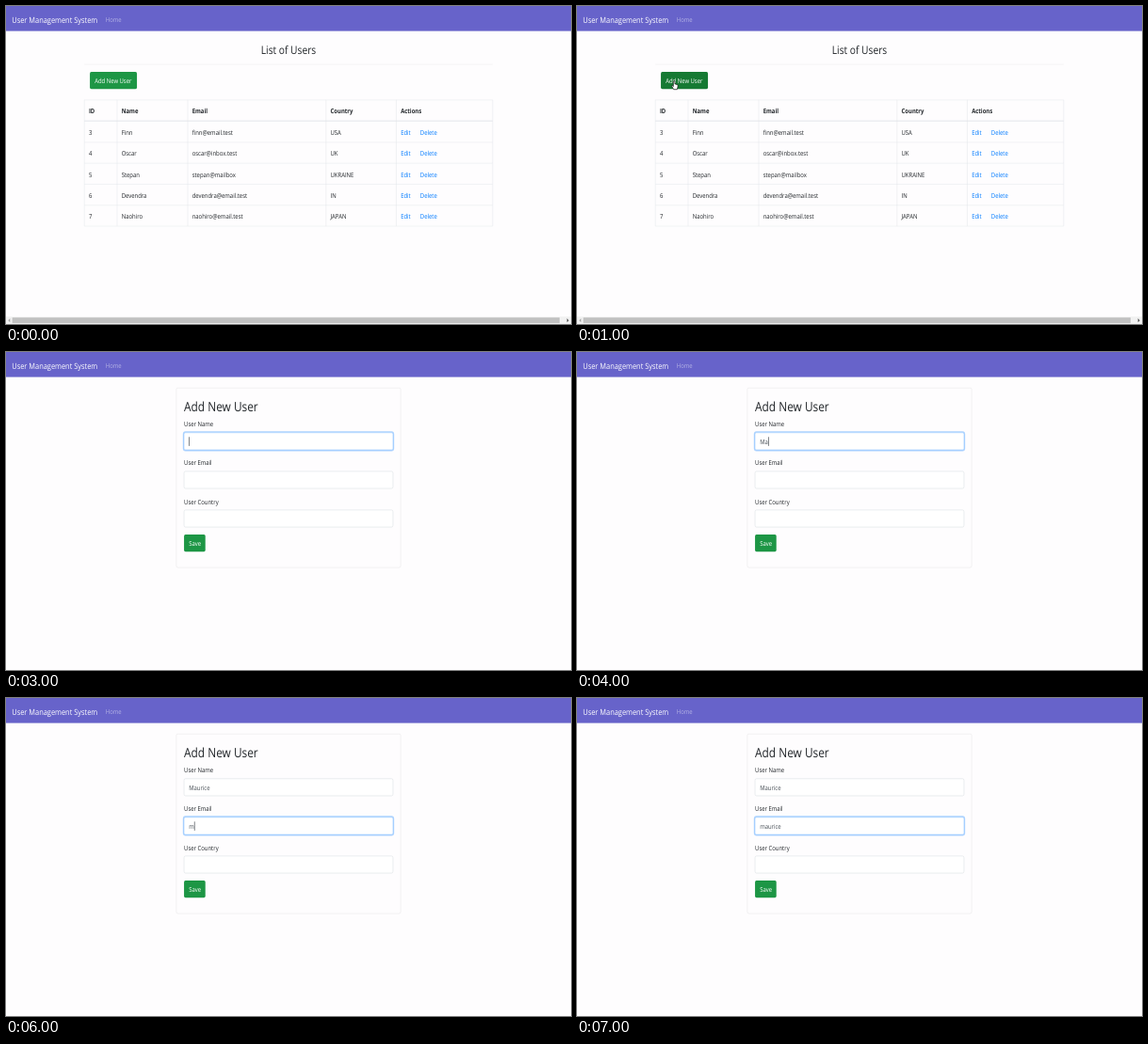
These frames come from a looping animation (600 px wide and 338 px high, 8 s). An HTML page:

```html
<!DOCTYPE html>
<html lang="en">
<head>
<meta charset="utf-8">
<title>User Management System</title>
<style>
  html, body { margin: 0; height: 100%; overflow: hidden; background: #fefdfe; }
  svg { display: block; width: 100vw; height: 100vh; }
  text { font: 15.2px "Open Sans", "Noto Sans", sans-serif; fill: #212529; text-rendering: geometricPrecision; }
  .brand { font-size: 19px; fill: #fff; }
  .nav { fill: #ffffff80; }
  .title { font-size: 26.2px; font-weight: 500; text-anchor: middle; }
  .heading { font-size: 30.4px; font-weight: 500; }
  .th { font-weight: 700; }
  .link { fill: #007bff; }
  .label { fill: #fff; }
  .value { fill: #495057; }
  .line { stroke: #dee2e6; fill: none; }
</style>
</head>
<body>
<!-- The page is 1536 x 743 and is squeezed into the stage. -->
<svg viewBox="0 0 1536 743" preserveAspectRatio="none">
  <rect width="1536" height="58.5" fill="#6763ca"/>
  <text class="brand" x="16" y="38.5">User Management System</text>
  <text class="nav" x="271" y="37.5">Home</text>
  <g id="view"></g>
</svg>
<script>
const view = document.getElementById('view');

const users = [
  [3, 'Finn', 'finn@email.test', 'USA'],
  [4, 'Oscar', 'oscar@inbox.test', 'UK'],
  [5, 'Stepan', 'stepan@mailbox', 'UKRAINE'],
  [6, 'Devendra', 'devendra@email.test', 'IN'],
  [7, 'Naohiro', 'naohiro@email.test', 'JAPAN'],
];
const columns = [213, 302, 494, 870, 1061, 1323];

// One state per second
const states = [
  { list: true },
  { list: true, hover: true },
  { list: true, hover: true, pressed: true },
  { values: [''], caret: true },
  { values: ['Ma'], caret: true },
  { values: ['Maurice'] },
  { values: ['Maurice', 'm'], caret: true },
  { values: ['Maurice', 'maurice'] },
];

const text = (x, y, content, cls = '') => `<text class="${cls}" x="${x}" y="${y}">${content}</text>`;
const line = d => `<path class="line" d="${d}"/>`;
const box = (x, y, w, h, style, r = 4) =>
  `<rect x="${x}" y="${y}" width="${w}" height="${h}" rx="${r}" ${style}/>`;
const ring = (x, y, w, h, color) =>
  box(x - 1.5, y - 1.5, w + 3, h + 3, `fill="none" stroke="${color}" stroke-width="3.5"`, 5.5);
const button = (x, y, w, label, fill = '#1d9645') =>
  box(x, y, w, 40, `fill="${fill}"`) + text(x + 13, y + 27, label, 'label');

const hand = `<path transform="translate(257 174)" fill="#fff" stroke="#111" stroke-width="1.6"
  d="M5 12V2q2-3 4 0v6l7 2q2 1 1 5l-2 6H6L1 14q-1-3 2-2l2 2z"/>`;

const scrollbar =
  box(0, 726, 1536, 17, 'fill="#f1f1f1"', 0) +
  box(17, 728, 1488, 13, 'fill="#c1c1c1"', 0) +
  '<path d="M11 730v9l-5-4.5z" fill="#a3a3a3"/><path d="M1525 730v9l5-4.5z" fill="#505050"/>';

function table() {
  const row = (cells, y, cls) => cells.map((c, i) => text(columns[i] + 12, y, c, cls)).join('');
  return columns.map(x => line(`M${x} 219.5V514.5`)).join('') +
    line('M213 219.5H1323') +
    '<path class="line" stroke-width="2" d="M213 268.5H1323"/>' +
    row(['ID', 'Name', 'Email', 'Country', 'Actions'], 251.5, 'th') +
    users.map((user, i) => {
      const y = 301.5 + 49 * i;
      return row(user, y) + text(1073, y, 'Edit', 'link') + text(1126, y, 'Delete', 'link') +
        line(`M213 ${y + 17}H1323`);
    }).join('');
}

function listView({ hover, pressed }) {
  return text(768, 113, 'List of Users', 'title') +
    '<path d="M213 136.5H1323" stroke="#0000001a"/>' +
    (pressed ? ring(228, 154, 128, 40, '#28a74580') : '') +
    button(228, 154, 128, 'Add New User', hover ? '#167a33' : undefined) +
    table() + scrollbar + (hover ? hand : '');
}

function formView({ values }) {
  const fields = ['User Name', 'User Email', 'User Country'].map((label, i) => {
    const y = 188.5 + 90.3 * i;
    const focused = i === values.length - 1;
    return text(484, y - 14, label) +
      (focused ? ring(484, y, 568, 40, '#007bff50') : '') +
      box(484, y, 568, 40, `fill="#fff" stroke="${focused ? '#80bdff' : '#ced4da'}"`) +
      text(497, y + 27, values[i] || '', 'value');
  });
  return box(463, 84, 610, 419.5, 'fill="none" stroke="#00000020"') +
    text(484, 139.5, 'Add New User', 'heading') +
    fields.join('') + button(484, 426.5, 58, 'Save');
}

function show(state) {
  view.innerHTML = state.list ? listView(state) : formView(state);
  if (!state.caret) return;
  const last = state.values.length - 1;
  const x = 497.5 + view.querySelectorAll('.value')[last].getComputedTextLength();
  view.innerHTML += box(x, 198.5 + 90.3 * last, 1.6, 21, 'fill="#343a40"', 0);
}

let shown = -1;
function tick(now) {
  const index = Math.floor(now / 1000) % states.length;
  if (index !== shown) show(states[shown = index]);
  requestAnimationFrame(tick);
}
tick(performance.now());
</script>
</body>
</html>
```
